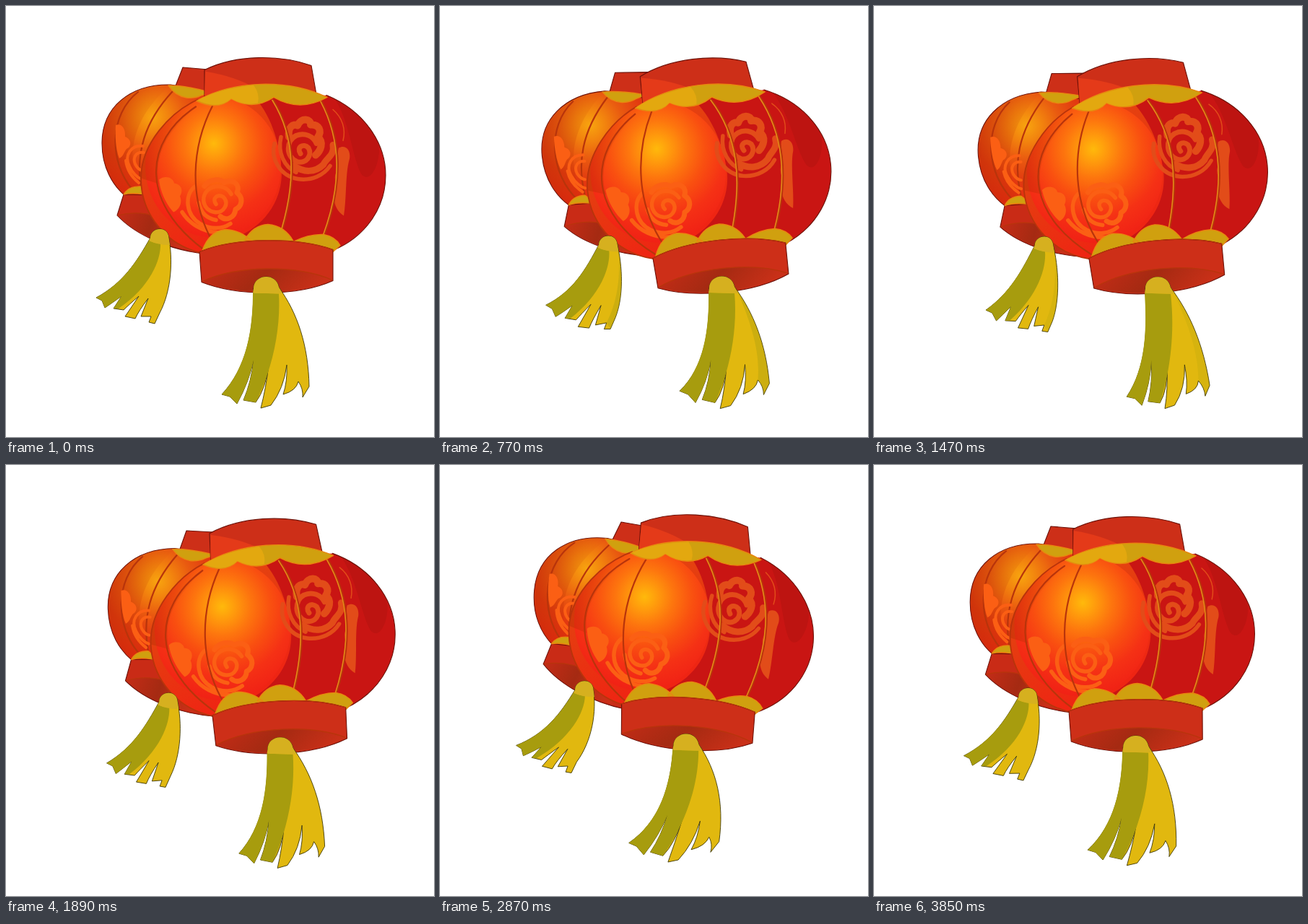
Write an HTML page that moves like this. It is 593x597 px and loops after 3920 ms.

```html
<!DOCTYPE html>
<html lang="en">
<head>
<meta charset="utf-8">
<title>Swinging lanterns</title>
<style>
html, body { margin: 0; width: 100%; height: 100%; overflow: hidden; background: #fff; }
svg { display: block; width: 593px; height: 597px; }
path { stroke-linecap: round; stroke-linejoin: round; }
.edge { stroke: #6d1209; stroke-width: 1.1; }
.line { fill: none; stroke: #b8340b; stroke-width: 2.2; }
.rib { fill: none; stroke: #e58a18; stroke-width: 1.6; }
.cap { fill: #cd2f18; }
.gold { fill: #d0a00f; stroke: #e9860f; stroke-width: 1.4; }
.art { fill: none; stroke: #fb5f14; stroke-width: 7; }
.fill { fill: #fb5f14; }
.dim .art { stroke: #e24c19; }
.dim .fill { fill: #e24c19; }
.thin { stroke-width: 4; }
.mid { stroke-width: 5.5; }
.strands { fill: #e1b80f; stroke: #3f3908; stroke-width: .9; }
.shade { fill: #a79c0e; }
.knot { fill: #d6b01f; }
</style>
</head>
<body>
<svg viewBox="0 0 593 597">
  <defs>
    <radialGradient id="glow" gradientUnits="userSpaceOnUse" cx="288" cy="190" r="134">
      <stop offset="0" stop-color="#ffb90b"/>
      <stop offset=".12" stop-color="#ff9e0c"/>
      <stop offset=".3" stop-color="#fd750e"/>
      <stop offset=".5" stop-color="#f95010"/>
      <stop offset=".72" stop-color="#f53115"/>
      <stop offset="1" stop-color="#f01f15"/>
    </radialGradient>
    <radialGradient id="glowBack" gradientUnits="userSpaceOnUse" cx="203" cy="154" r="122">
      <stop offset="0" stop-color="#f8a50f"/>
      <stop offset=".18" stop-color="#f2830e"/>
      <stop offset=".38" stop-color="#e95a10"/>
      <stop offset=".62" stop-color="#e23a10"/>
      <stop offset="1" stop-color="#e52412"/>
    </radialGradient>
    <linearGradient id="halo" x1="0" x2=".4" y1="0" y2="1">
      <stop offset="0" stop-color="#e2560f"/>
      <stop offset=".55" stop-color="#e53d10"/>
      <stop offset="1" stop-color="#ef2413"/>
    </linearGradient>
    <linearGradient id="rim" x1="0" x2="1" y1="0" y2=".2">
      <stop offset="0" stop-color="#c42c17"/>
      <stop offset=".5" stop-color="#a52a12"/>
      <stop offset="1" stop-color="#c93018"/>
    </linearGradient>
    <linearGradient id="side" x1="0" x2="1" y1="0" y2="0">
      <stop offset="0" stop-color="#aa2a00" stop-opacity=".35"/>
      <stop offset="1" stop-color="#c03000" stop-opacity="0"/>
    </linearGradient>
    <clipPath id="ball">
      <path d="M266,129 C228,146 187,190 187,238 C187,288 222,330 269,341 L453,338 C497,320 526,280 526,234 C526,188 495,144 444,123 Z"/>
    </clipPath>
  </defs>

  <g id="back">
    <path class="edge" fill="url(#glowBack)" d="M228,109 C172,108 133,140 133,190 C133,224 148,248 164,262 L200,310 L300,310 L300,120 Z"/>
    <path fill="url(#side)" d="M228,110 C172,109 134,140 134,190 C134,224 148,248 164,262 L190,262 C160,210 178,150 228,110 Z"/>
    <path class="line" d="M183,119 C143,150 142,215 175,254 M231,118 C192,160 178,205 188,258"/>
    <path class="fill" d="M152,165 C160,162 166,170 165,181 C175,185 174,195 167,198 C163,203 163,208 157,211 C152,199 151,180 152,165 Z"/>
    <path class="art thin" d="M190,194 C174,192 163,206 171,222 C175,231 182,238 188,240 M191,203 C181,201 175,209 179,219 Q183,227 189,228 M166,214 Q168,232 184,245"/>
    <path class="cap edge" d="M245,85 L292,89 L292,126 L234,113 Z"/>
    <path class="gold" d="M225,110 Q250,110 284,120 L270,124 Q262,128 250,127 Q234,124 225,110 Z"/>
    <path class="edge" fill="#c92b16" d="M163,261 L154,290 C180,318 228,338 274,343 L285,310 L212,262 Z"/>
    <path fill="url(#rim)" d="M155,290 C182,283 210,288 232,302 L255,337 C215,331 178,314 155,290 Z"/>
    <path class="line" style="stroke-width:1.2" d="M155,290 C182,283 210,288 230,302"/>
    <path class="gold" d="M163,261 Q170,249 187,250 L202,264 Q180,257 163,261 Z"/>
  </g>

  <g id="front">
    <g clip-path="url(#ball)">
      <path fill="#c91513" d="M180,100 H540 V350 H180 Z"/>
      <path fill="#bd1411" d="M448,118 C476,150 478,205 492,232 C503,246 516,224 517,200 C515,165 490,135 448,118 Z"/>
      <path fill="url(#halo)" d="M180,80 L276,88 C345,100 378,160 382,230 C382,280 345,318 296,326 L290,345 H180 Z"/>
      <ellipse fill="url(#glow)" cx="287" cy="222" rx="94" ry="98"/>
      <path fill="url(#side)" d="M266,129 C228,146 187,190 187,238 L212,246 C204,205 226,168 266,139 Z"/>
      <path class="fill" d="M212,240 C220,233 232,237 233,245 C243,246 246,255 241,263 C245,272 240,282 232,285 C222,274 214,258 212,240 Z"/>
      <path class="art" d="M275,249 C282,238 298,239 302,244 C315,238 325,247 320,258 C330,266 326,278 318,281 C317,293 305,298 297,291"/>
      <path class="art mid" d="M291,274 C285,266 293,259 301,264 C310,272 302,287 289,285 C273,283 269,264 280,254 C290,246 305,248 312,260"/>
      <path class="art mid" d="M261,250 C247,262 249,289 269,301 C283,309 299,309 311,301 M244,285 C254,301 272,312 292,313 M267,272 C270,287 280,294 291,296"/>
      <g class="dim">
        <path class="art" style="stroke-width:10" d="M392,181 C390,167 398,162 404,165 C409,153 423,156 422,164 C434,163 438,173 432,181 C441,188 436,200 429,206"/>
        <path class="art" d="M408,204 C402,195 412,189 419,196 C425,206 416,219 403,215 C387,208 388,186 402,179 C414,174 426,180 430,190"/>
        <path class="art" style="stroke-width:9" d="M453,192 C456,206 443,211 440,219 C428,231 412,230 399,221"/>
        <path class="art mid" d="M372,190 C366,211 380,235 404,239 C424,242 440,234 449,221 M381,181 C376,202 385,222 402,230"/>
        <path class="fill" d="M461,196 C470,191 478,198 476,211 C470,230 472,266 468,290 C458,284 453,272 455,259 C461,248 452,240 458,229 C463,217 458,206 461,196 Z"/>
        <path class="art" style="stroke-width:1.5" d="M453,143 C466,154 471,170 467,186"/>
      </g>
      <path class="line" d="M263,139 C191,187 185,270 273,336"/>
      <path class="line" d="M286,138 C257,195 253,265 285,324"/>
      <path class="line" style="stroke-width:3.4" d="M370,130 C404,185 401,245 383,308 M437,132 C465,185 467,245 440,318"/>
      <path class="rib" d="M369,130 C403,185 400,245 382,308 M436,132 C464,185 466,245 439,318"/>
    </g>
    <path class="line" style="stroke-width:1.8" d="M266,129 C228,146 187,190 187,238 C187,288 222,330 269,341"/>
    <path class="edge" fill="none" d="M444,123 C495,144 526,188 526,234 C526,280 497,320 453,338"/>
    <path class="cap edge" d="M275,88 C320,66 380,67 423,82 L430,122 L275,126 Z"/>
    <path fill="#e43a19" d="M276,90 Q318,97 347,114 L275,124 Z"/>
    <path class="gold" d="M264,131 C315,102 390,100 445,126 Q407,147 371,126 Q342,145 312,128 Q294,145 264,131 Z"/>
    <path fill="#ecab10" opacity=".7" d="M265,130 Q295,114 343,109 Q352,121 349,134 Q330,138 312,128 Q294,144 265,130 Z"/>
    <path class="gold" d="M272,338 Q282,311 304,309 Q326,310 341,326 L330,335 Z M331,323 Q343,303 363,302 Q386,304 398,325 L380,335 Z M398,326 Q420,315 440,316 Q456,319 463,331 L453,340 Z"/>
    <path class="cap edge" d="M268,340 C320,319 405,320 453,337 L453,380 C404,402 322,402 271,382 Z"/>
    <path fill="url(#rim)" d="M272,381 C322,358 404,358 452,379 C404,400 322,401 272,381 Z"/>
    <path class="line" style="stroke-width:1.3" d="M272,381 C322,358 404,358 452,379 M268,340 C320,319 405,320 453,337"/>
  </g>
  <g id="tassels"></g>
</svg>
<script>
const LOOP = 3920, STEP = 70;

// time, front angle x y, back angle x y, front tips (left x y, right x y), back tips, dark fringe, sag
const poses = [
  [0,    0, 0, .5,       0, 0, 0,      0, 0, 0, 0,         0, 0, 0, 0,       0, 0],
  [490,  -3.9, 0, 2.5,   -3.4, -2, 5,  6, -10, 16, -4,     5, -1, 15, 1,     .3, 9],
  [1120, -6.6, 5, 2,     -7.3, -2, 9,  62, 3, 58, -5,      41, 24, 44, 12,   .35, 0],
  [1890, -2.5, 7, 3.5,   -1.8, 5, 6,   24, 0, 22, 1,       16, 10, 15, 6,    0, 1],
  [2870, 4.5, 3, -2,     4.8, 6, -6,   -38, -15, -36, -6,  -23, -19, -24, -14, 0, 4],
  [3430, 3.2, 1, 2.5,    2.8, 0, -3,   -23, -7, -23, 2,    -15, -8, -18, -6, 1, 5],
  [3850, -.3, .7, .5,    -.1, 0, 0,    -3, -5, -2, 1,      -1, -2, 1, -3,    0, 0]
];

const pivots = { front: [350, 90], back: [245, 85] };

const tassels = [
  {
    top: [212, 312], len: 115, left: 125, right: 210,
    strands: "M200,321 C200,307 222,304 225,318 C232,352 229,395 213,425 L206,440 L198,438 L201,430 L187,430 L197,405 Q184,422 179,433 L165,430 L184,402 Q170,414 163,421 L149,419 L160,402 Q146,412 137,418 L133,408 L125,404 C162,384 181,355 200,321 Z",
    shade: "M198,325 Q207,329 214,329 C215,352 199,390 156,419 L149,419 L160,402 Q146,412 137,418 L133,408 L125,404 C161,384 180,356 198,325 Z",
    knot: "M200,321 C200,307 222,304 225,318 L227,331 Q210,331 198,325 Z",
    fringe: "M227,340 C231,370 226,402 213,425 L206,440 L201,430 C218,405 227,370 227,340 Z"
  },
  {
    top: [360, 376], len: 165, left: 299, right: 420,
    strands: "M343,391 C343,371 374,368 378,389 C404,425 419,470 420,527 L411,542 Q412,530 405,520 Q402,533 384,538 Q390,520 389,497 Q385,530 367,553 L353,557 Q360,530 364,497 Q360,530 346,549 L329,546 Q340,520 343,490 Q337,520 320,551 L310,541 L299,538 C334,500 343,450 343,391 Z",
    shade: "M342,397 L378,398 C381,450 368,505 346,549 L329,546 Q340,520 343,490 Q337,520 320,551 L310,541 L299,538 C333,500 342,450 342,397 Z",
    knot: "M343,391 C343,371 374,368 378,389 L383,398 L342,397 Z",
    fringe: "M382,395 C405,430 418,470 420,527 L411,542 Q412,530 405,520 C411,480 400,440 382,395 Z"
  }
];

const holder = document.getElementById("tassels");
for (const t of tassels) {
  t.parts = ["strands", "shade", "fringe", "knot"].map(name => {
    const el = document.createElementNS("http://www.w3.org/2000/svg", "path");
    el.setAttribute("class", name === "fringe" ? "shade" : name);
    holder.append(el);
    return { name, el };
  });
}

const clamp = v => Math.max(0, Math.min(1, v));

// Smooth curve through the poses, open at both ends.
function poseAt(time) {
  const last = poses.length - 1;
  if (time >= poses[last][0]) return poses[last];
  const i = poses.findIndex((p, k) => time < poses[k + 1][0]);
  const a = poses[i], b = poses[i + 1];
  const before = poses[Math.max(0, i - 1)], after = poses[Math.min(last, i + 2)];
  const h = b[0] - a[0], s = (time - a[0]) / h;
  return a.map((v, k) => {
    const m0 = (b[k] - before[k]) / (b[0] - before[0]) * h;
    const m1 = (after[k] - v) / (after[0] - a[0]) * h;
    const s2 = s * s, s3 = s2 * s;
    return (2 * s3 - 3 * s2 + 1) * v + (s3 - 2 * s2 + s) * m0
         + (3 * s2 - 2 * s3) * b[k] + (s3 - s2) * m1;
  });
}

function place(id, [angle, dx, dy]) {
  const [px, py] = pivots[id];
  document.getElementById(id).setAttribute("transform",
    `translate(${dx} ${dy}) rotate(${angle} ${px} ${py})`);
}

function shiftOf([x, y], [px, py], [angle, dx, dy]) {
  const r = angle * Math.PI / 180, c = Math.cos(r), s = Math.sin(r);
  const u = x - px, v = y - py;
  return [u * c - v * s - u + dx, u * s + v * c - v + dy];
}

// Bends the strands: the knot follows the lantern, the tips trail freely.
function bend(t, top, tips, fringe, sag) {
  const move = (_, xs, ys) => {
    const x = +xs, y = +ys;
    const w = clamp((y - t.top[1]) / t.len) ** 2;
    const u = clamp((x - t.left) / (t.right - t.left));
    const shift = k => (1 - w) * top[k] + w * (tips[k] * (1 - u) + tips[k + 2] * u);
    const drop = 4 * u * (1 - u) * w * sag;
    return (x + shift(0)).toFixed(1) + "," + (y + shift(1) + drop).toFixed(1);
  };
  for (const { name, el } of t.parts) {
    el.setAttribute("d", t[name].replace(/([\d.]+),([\d.]+)/g, move));
    if (name === "fringe") el.setAttribute("opacity", clamp(fringe));
  }
}

function draw(time) {
  const p = poseAt(Math.floor(time % LOOP / STEP) * STEP);
  const front = p.slice(1, 4), back = p.slice(4, 7);
  const [fringe, sag] = p.slice(15);
  place("front", front);
  place("back", back);
  bend(tassels[0], shiftOf(tassels[0].top, pivots.back, back), p.slice(11, 15), fringe, sag);
  bend(tassels[1], shiftOf(tassels[1].top, pivots.front, front), p.slice(7, 11), fringe, sag);
}

let start;
function tick(now) {
  start ??= now;
  draw(now - start);
  requestAnimationFrame(tick);
}
draw(0);
requestAnimationFrame(tick);
</script>
</body>
</html>
```
